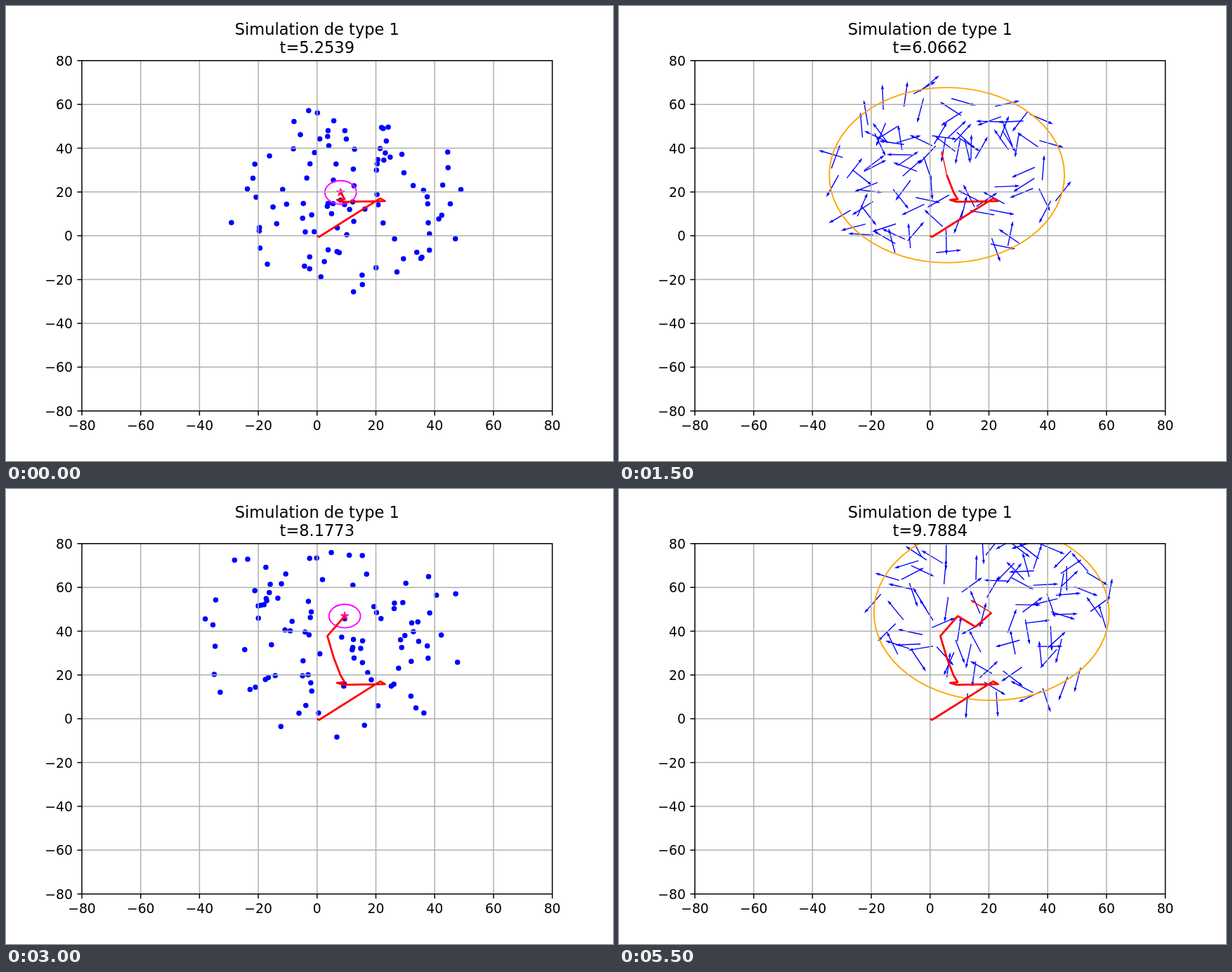
These frames come from a looping animation (864 by 648 pixels, 6000 ms). An HTML page with a canvas:

```html
<!DOCTYPE html>
<html lang="fr">
<head>
<meta charset="utf-8">
<title>Simulation de type 1</title>
<style>
html, body { margin: 0; width: 100%; height: 100%; overflow: hidden; background: #fff; }
canvas { display: block; width: 864px; height: 648px; }
</style>
</head>
<body>
<canvas id="stage" width="864" height="648"></canvas>
<script>
const ctx = document.getElementById('stage').getContext('2d');
const BOX = { l: 108, t: 77.76, r: 777.6, b: 576.72 };
const SX = (BOX.r - BOX.l) / 160, SY = (BOX.b - BOX.t) / 160;
const X = x => BOX.l + (x + 80) * SX;
const Y = y => BOX.b - (y + 80) * SY;
const FONT = '"DejaVu Sans", sans-serif';
const TAU = Math.PI * 2;

const STEP = 500, HITS = 6, FIRST = 7;
const COUNT = 100, RANGE = 40, REACH = 5.35;
const ARROW = 36;

const times = ['5.2539', '6.0662', '7.1045', '8.1773', '8.9541', '9.7884'];
// Course of the heavy particle; the last point only gives its final heading.
const path = [
  [0, 0], [0.7, -0.5], [21.5, 17.1], [23.1, 15.8], [9.1, 15.5], [6.8, 16.4], [9.4, 16.7],
  [8, 19.8], [5.7, 27.7], [3.5, 37.8], [9.4, 46.9], [15.4, 42], [20.9, 48.4], [13.7, 52.8]
];
// Vertical offset of the struck particle at each hit.
const struck = [-3.5, 4.1, -3.1, -1.2, -2.1, 2, 3];

function random(seed) {
  return () => {
    seed = (seed + 0x6D2B79F5) | 0;
    let t = Math.imul(seed ^ (seed >>> 15), 1 | seed);
    t = (t + Math.imul(t ^ (t >>> 7), 61 | t)) ^ t;
    return ((t ^ (t >>> 14)) >>> 0) / 4294967296;
  };
}

// Light particles that start around one hit and fly on until the next,
// all as fast as the heavy one.
function makeSwarm(k) {
  const rnd = random(911 + k * 77);
  const [cx, cy] = path[FIRST + k - 1], [hx, hy] = path[FIRST + k];
  const travel = Math.hypot(hx - cx, hy - cy);
  const a0 = rnd() * TAU, sy = hy + struck[k];
  const list = [{
    x: hx - travel * Math.cos(a0), y: sy - travel * Math.sin(a0), a: a0, ex: hx, ey: sy
  }];
  while (list.length < COUNT) {
    const r = RANGE * Math.sqrt(rnd()), q = rnd() * TAU, a = rnd() * TAU;
    const x = cx + r * Math.cos(q), y = cy + r * Math.sin(q);
    const ex = x + travel * Math.cos(a), ey = y + travel * Math.sin(a);
    if (Math.hypot(ex - hx, ey - hy) > REACH) list.push({ x, y, a, ex, ey });
  }
  return list;
}
const swarms = Array.from({ length: HITS + 1 }, (_, k) => makeSwarm(k));

function line(points, color, width) {
  ctx.beginPath();
  points.forEach(([x, y]) => ctx.lineTo(x, y));
  ctx.strokeStyle = color;
  ctx.lineWidth = width;
  ctx.stroke();
}

function ring([x, y], r, color) {
  ctx.beginPath();
  ctx.ellipse(X(x), Y(y), r * SX, r * SY, 0, 0, TAU);
  ctx.strokeStyle = color;
  ctx.lineWidth = 1.9;
  ctx.stroke();
}

function dot(x, y) {
  ctx.beginPath();
  ctx.arc(X(x), Y(y), 3.75, 0, TAU);
  ctx.fillStyle = '#00f';
  ctx.fill();
}

function star([x, y]) {
  ctx.beginPath();
  for (let i = 0; i < 10; i++) {
    const r = i % 2 ? 2.5 : 6.3, a = i * Math.PI / 5;
    ctx.lineTo(X(x) + r * Math.sin(a), Y(y) - r * Math.cos(a));
  }
  ctx.closePath();
  ctx.fillStyle = ctx.strokeStyle = '#ff1493';
  ctx.lineWidth = 1;
  ctx.fill();
  ctx.stroke();
}

function arrow(x, y, a, color) {
  const w = 0.7, head = 7, notch = 6.3;
  ctx.save();
  ctx.translate(X(x), Y(y));
  ctx.rotate(-a);
  ctx.beginPath();
  [[0, -w], [ARROW - notch, -w], [ARROW - head, -3 * w], [ARROW, 0],
   [ARROW - head, 3 * w], [ARROW - notch, w], [0, w]].forEach(p => ctx.lineTo(...p));
  ctx.fillStyle = color;
  ctx.fill();
  ctx.restore();
}

function text(str, x, y, size, align) {
  ctx.font = size + 'px ' + FONT;
  ctx.textAlign = align;
  ctx.fillStyle = '#000';
  ctx.fillText(str, x, y);
}

function grid() {
  for (let v = -60; v < 80; v += 20) {
    line([[X(v), BOX.t], [X(v), BOX.b]], '#b0b0b0', 1.5);
    line([[BOX.l, Y(v)], [BOX.r, Y(v)]], '#b0b0b0', 1.5);
  }
}

function axes() {
  ctx.strokeStyle = '#000';
  ctx.lineWidth = 1.5;
  ctx.strokeRect(BOX.l, BOX.t, BOX.r - BOX.l, BOX.b - BOX.t);
  for (let v = -80; v <= 80; v += 20) {
    const x = X(v), y = Y(v);
    const label = v < 0 ? '\u2212' + -v : String(v);
    line([[x, BOX.b], [x, BOX.b + 6.6]], '#000', 1.5);
    line([[BOX.l - 6.6, y], [BOX.l, y]], '#000', 1.5);
    text(label, x, 604.4, 18.75, 'center');
    text(label, 94.9, y + 7.1, 18.75, 'right');
  }
}

function draw(ms) {
  const step = Math.floor(ms / STEP) % (HITS * 2);
  const k = step >> 1, showArrows = step % 2 === 1;
  const here = path[FIRST + k], next = path[FIRST + k + 1];

  ctx.fillStyle = '#fff';
  ctx.fillRect(0, 0, 864, 648);

  ctx.save();
  ctx.beginPath();
  ctx.rect(BOX.l, BOX.t, BOX.r - BOX.l, BOX.b - BOX.t);
  ctx.clip();
  if (showArrows) {
    swarms[k + 1].forEach(p => arrow(p.x, p.y, p.a, '#00f'));
    arrow(...here, Math.atan2(next[1] - here[1], next[0] - here[0]), '#f00');
    ring(here, RANGE, '#ffa500');
  } else {
    swarms[k].forEach(p => dot(p.ex, p.ey));
    star(here);
    ring(here, REACH, '#f0f');
  }
  grid();
  ctx.lineJoin = 'round';
  line(path.slice(0, FIRST + k + 1).map(([x, y]) => [X(x), Y(y)]), '#f00', 2.8);
  ctx.restore();

  axes();
  text('Simulation de type 1', 442.8, 40.8, 22.5, 'center');
  text('t=' + times[k], 442.8, 67, 22.5, 'center');
}

const start = performance.now();
function tick() {
  draw(performance.now() - start);
  requestAnimationFrame(tick);
}
tick();
</script>
</body>
</html>
```
